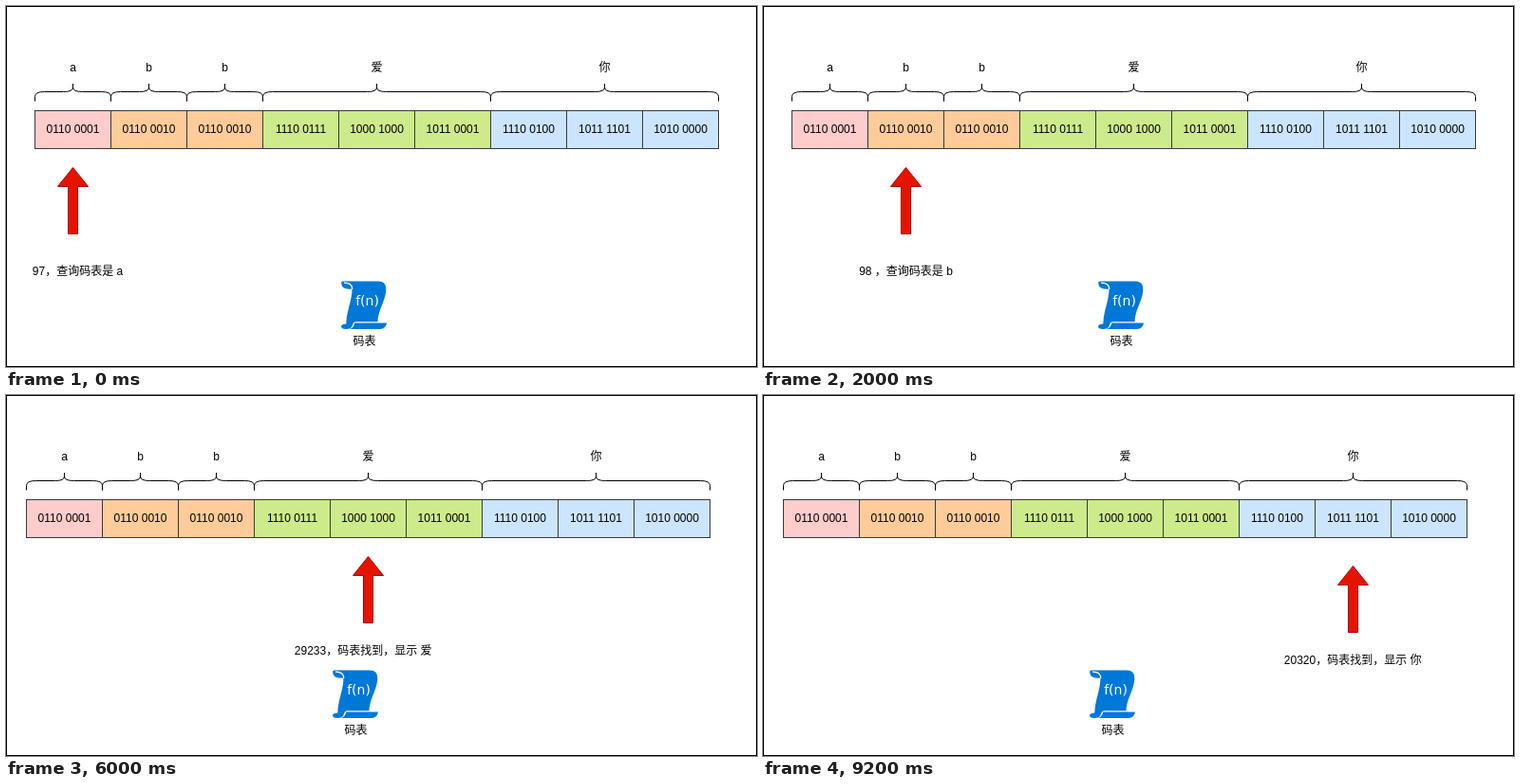
Animation, 791 px wide and 381 px high, one loop 10000 ms. Source, as an HTML page:

```html
<!DOCTYPE html>
<html lang="zh-CN">
<head>
<meta charset="utf-8">
<title>Decoding bytes</title>
<style>
  html, body { margin: 0; width: 100%; height: 100%; overflow: hidden; background: #fff; }
  svg { display: block; }
  text {
    font: 12px "Liberation Sans", "Noto Sans CJK SC", "Noto Sans CJK", sans-serif;
    text-anchor: middle;
    fill: #000;
  }
  .cell { stroke: #36393d; }
  .brace { fill: none; stroke: #000; }
  .arrow { fill: #e51400; stroke: #b20000; }
  .formula { font: 14px "DejaVu Sans", sans-serif; fill: #fff; }
  .diagram { animation: shift 10s step-end infinite; }
  .step { visibility: hidden; animation: show 10s step-end infinite; }
  @keyframes shift {
    0% { transform: translateX(0); }
    60%, 100% { transform: translateX(-9px); }
  }
  @keyframes show {
    0% { visibility: visible; }
    20%, 100% { visibility: hidden; }
  }
</style>
</head>
<body>
<svg width="791" height="381" viewBox="0 0 791 381">
  <rect x=".5" y=".5" width="790" height="380" fill="#fff" stroke="#000"/>
  <g class="diagram">
    <g id="row"></g>
    <g fill="#0078d7">
      <path d="M355 290.5H392Q400.5 290.5 400.3 299C400 311 392 320 391.5 333.2H368Q365.5 333.6 365 336.5Q364 341 358 341Q353 341 353 338Q353.5 335.4 358.3 335.4C358.5 322 364.5 311 364.5 298.5Q358 299.5 355 297Q352.5 294 353.5 291Z"/>
      <path d="M367.2 334.6H401Q400 341 394 341H362Q366.5 339.5 367.2 334.6Z"/>
      <path d="M356 292.2Q364.5 292 364.8 299" fill="none" stroke="#fff" stroke-width="1.2"/>
    </g>
    <text class="formula" x="380.5" y="316">f(n)</text>
    <text x="377.5" y="358">码表</text>
  </g>
  <g id="steps"></g>
</svg>
<script>
  const LEFT = 30.5, CELL = 80;

  const groups = [
    { char: 'a', fill: '#ffcccc', bytes: ['0110 0001'] },
    { char: 'b', fill: '#ffcc99', bytes: ['0110 0010'] },
    { char: 'b', fill: '#ffcc99', bytes: ['0110 0010'] },
    { char: '爱', fill: '#cdeb8b', bytes: ['1110 0111', '1000 1000', '1011 0001'] },
    { char: '你', fill: '#cce5ff', bytes: ['1110 0100', '1011 1101', '1010 0000'] }
  ];

  const steps = [
    { x: 70.5, y: 170.5, textX: 75.5, textY: 284, label: '97，查询码表是 a' },
    { x: 150.5, y: 170.5, textX: 150.5, textY: 284, label: '98 ，查询码表是 b' },
    { x: 230.5, y: 170.5, textX: 230.5, textY: 284, label: '98 ，查询码表是 b' },
    { x: 381.5, y: 170.5, textX: 376.2, textY: 274, label: '29233，码表找到，显示 爱' },
    { x: 621.5, y: 180.5, textX: 621.2, textY: 284, label: '20320，码表找到，显示 你' }
  ];

  const text = (x, y, s) => `<text x="${x}" y="${y}">${s}</text>`;

  const cell = (x, fill, bits) =>
    `<rect class="cell" x="${x}" y="110.5" width="${CELL}" height="40" fill="${fill}"/>` +
    text(x + CELL / 2, 134, bits);

  function brace(x, width) {
    const mid = x + width / 2, end = x + width;
    return `<path class="brace" d="M${x} 100.5V95.5Q${x} 90.5 ${x + 10} 90.5H${mid - 10}` +
      `Q${mid} 90.5 ${mid} 86V82V86Q${mid} 90.5 ${mid + 10} 90.5H${end - 10}` +
      `Q${end} 90.5 ${end} 95.5V100.5"/>`;
  }

  const arrow = (x, y) =>
    `<path class="arrow" d="M${x} ${y}l16 20h-11v50h-10v-50h-11z"/>`;

  let x = LEFT, row = '';
  for (const { char, fill, bytes } of groups) {
    const width = bytes.length * CELL;
    row += brace(x, width) + text(x + width / 2, 69, char);
    bytes.forEach((bits, i) => row += cell(x + i * CELL, fill, bits));
    x += width;
  }
  document.getElementById('row').innerHTML = row;

  // Negative delays keep every step on the same ten-second clock.
  document.getElementById('steps').innerHTML = steps.map((s, i) =>
    `<g class="step" style="animation-delay:${i ? i * 2 - 10 : 0}s">` +
    arrow(s.x, s.y) + text(s.textX, s.textY, s.label) + '</g>').join('');
</script>
</body>
</html>
```
